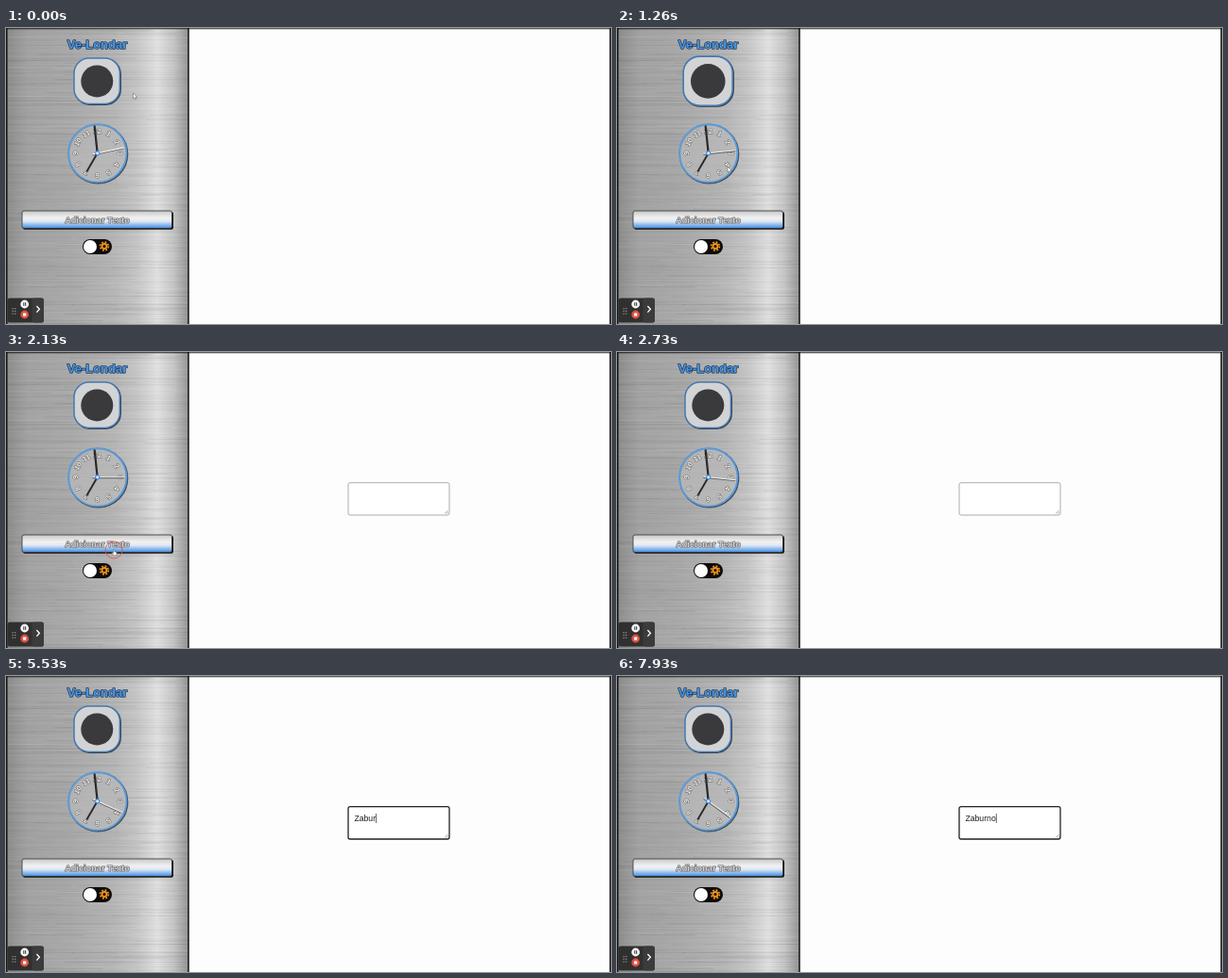
Animation of 640 by 314 pixels, one loop 8000 ms. Source, as an HTML page with a canvas:

```html
<!DOCTYPE html>
<html lang="pt">
<head>
<meta charset="utf-8">
<title>Lembretes</title>
<style>
  html, body { margin: 0; width: 100%; height: 100%; overflow: hidden; background: #fdfdfd; }
  canvas, svg { position: absolute; left: 0; top: 0; display: block; }
  text { font-family: "Liberation Sans", Arial, sans-serif; }
  .outlined { paint-order: stroke; stroke-linejoin: round; text-anchor: middle; font-weight: bold; }
  .numeral { font-size: 7.8px; fill: #f0f0f0; stroke: #666; stroke-width: 1; }
</style>
</head>
<body>
<canvas id="metal" width="193" height="314"></canvas>
<svg width="640" height="314" viewBox="0 0 640 314">
  <defs>
    <linearGradient id="steel" x2="0" y2="1">
      <stop offset="0" stop-color="#c9c9c9"/>
      <stop offset=".4" stop-color="#f1f1f1"/>
      <stop offset=".6" stop-color="#dfe9f5"/>
      <stop offset="1" stop-color="#3f8ae0"/>
    </linearGradient>
    <linearGradient id="topShade" x2="0" y2="1">
      <stop offset="0" stop-color="#000" stop-opacity=".85"/>
      <stop offset="1" stop-color="#000" stop-opacity="0"/>
    </linearGradient>
  </defs>

  <rect width="640" height="2" fill="url(#topShade)"/>
  <path d="M.8 0V314M193 0V314M639.2 0V314" stroke="#111" stroke-width="1.5"/>

  <text class="outlined" x="96.5" y="22.3" font-size="13"
        fill="#4596e8" stroke="#26384c" stroke-width="1.4">Ve-Londar</text>

  <g id="badge">
    <rect x="72.8" y="32.8" width="48.4" height="48.4" rx="16" fill="none" stroke="#2c3540" stroke-width="1.4"/>
    <rect x="72" y="32" width="48.4" height="48.4" rx="16" fill="#d2d3d5" stroke="#4379b0" stroke-width="1.5"/>
    <circle cx="96.3" cy="56.4" r="17" fill="#3a3a3c"/>
  </g>

  <g transform="translate(96.7 132.8)">
    <circle cx=".8" cy=".9" r="31" fill="none" stroke="#46525e" stroke-width="1.7"/>
    <circle r="30.7" fill="#b9b9b9" fill-opacity=".7" stroke="#559ce2" stroke-width="1.7"/>
    <g id="numerals"></g>
    <g stroke-linecap="round">
      <path d="M0 0L-11 19" stroke="#2a2a2a" stroke-width="1.9"/>
      <path d="M0 0L-3 -28.5" stroke="#2a2a2a" stroke-width="2.2"/>
      <g id="second">
        <path d="M.7 5V-28" stroke="#555" stroke-width="1.4"/>
        <path d="M0 5V-28.5" stroke="#f4f4f4" stroke-width="1.1"/>
      </g>
    </g>
    <circle r="2" fill="#fff" stroke="#3b8fe8" stroke-width="1.2"/>
  </g>

  <rect x="18" y="195" width="159" height="18.8" rx="2" fill="#0b0b0b"/>
  <rect x="17" y="194" width="158.5" height="18.5" rx="2" fill="url(#steel)" stroke="#333" stroke-width=".8"/>
  <text class="outlined" x="96.5" y="206.5" font-size="9.2"
        fill="#d2d2d2" stroke="#626262" stroke-width="1.2">Adicionar Texto</text>

  <rect x="81" y="224" width="31" height="16" rx="8" fill="#0c0c0c"/>
  <circle cx="89" cy="232" r="7" fill="#fff"/>
  <g transform="translate(104 231.5)" fill="none" stroke="#f0941c">
    <circle r="2.5" stroke-width="1.9"/>
    <circle r="4.4" stroke-width="1.7" stroke-dasharray="1.9 1.556"/>
  </g>

  <rect x="1.5" y="286.5" width="38.5" height="26" rx="2.5" fill="#303030"/>
  <rect x="27.5" y="286.5" width="12.5" height="26" rx="2.5" fill="#3b3b3b"/>
  <path d="M7.2 297V304M9.7 297V304" stroke="#999" stroke-width="1.2" stroke-dasharray="1.2 1.6"/>
  <circle cx="19.7" cy="293" r="4.4" fill="#f5f5f5"/>
  <path d="M18.8 291.2v3.6M20.7 291.2v3.6" stroke="#333"/>
  <circle cx="19.7" cy="304" r="4.4" fill="#e0503f"/>
  <rect x="18.1" y="302.4" width="3.2" height="3.2" fill="#fff"/>
  <path d="M32.4 295l3 3.3-3 3.3" fill="none" stroke="#fff" stroke-width="1.3"/>

  <g id="note">
    <rect id="field" x="362" y="138.7" width="107" height="34.3" rx="2" fill="#fff"/>
    <path d="M464.3 171.3l3.2-3.2M466.3 171.5l1.4-1.4" stroke="#777" stroke-width=".7"/>
    <text id="typed" x="368.4" y="153.5" font-size="8.7" fill="#1c1c1c"></text>
    <rect id="caret" y="146" width=".8" height="10" fill="#444"/>
  </g>

  <g id="pointer" stroke="#555" stroke-width=".5" stroke-linejoin="round">
    <path id="arrow" d="M.5 0V6L1.9 4.8 2.8 6.8 3.8 6.4 2.9 4.5H4.7Z" fill="#fff"/>
    <path id="hand" d="M0 0q.8-.6 1.2 .2V2.2l2.4 .7V5L2.9 6.4H.4L-1.4 3.6l.6-.5 .8 .7Z" fill="#fff"/>
  </g>
  <circle id="ring" cx="114" cy="210" r="9" fill="none" stroke="#e0524c" stroke-width=".9"/>
</svg>

<script>
const LOOP = 8000;
const WORD = "Zaburno";
const KEY_TIMES = [4530, 4860, 5130, 5330, 5460, 5660, 5860];
const CARET_ON = [[3000, 3530], [4000, 6330], [6860, 7400], [7900, 8000]];
// The pointer is not drawn inside the text field.
const POINTER_ON = [[0, 2600], [6580, 7400]];
// time, x, y of the pointer tip
const POINTER_PATH = [
  [0, 134, 69], [60, 133, 69], [300, 118, 65], [860, 103, 62], [1000, 103, 62],
  [1260, 116.5, 147], [1860, 113.5, 209.5], [2200, 113.5, 209.5], [2600, 360, 160],
  [2930, 410, 155], [6530, 455, 163], [6660, 503, 171.5], [6900, 521, 175],
  [7260, 470.5, 163]
];
const BADGE_SCALE = [[0, 1], [200, 1], [600, 1.09], [1200, 1.09], [1600, 1]];

const el = id => document.getElementById(id);
const show = (id, on) => el(id).setAttribute("display", on ? "inline" : "none");
const within = (t, spans) => spans.some(([from, to]) => t >= from && t < to);

function sample(table, t) {
  const next = table.findIndex(row => row[0] > t);
  if (next < 0) return table[table.length - 1].slice(1);
  const a = table[next - 1], b = table[next];
  const k = (t - a[0]) / (b[0] - a[0]);
  return a.slice(1).map((v, i) => v + (b[i + 1] - v) * k);
}

function paintMetal() {
  const ctx = el("metal").getContext("2d");
  const shade = ctx.createLinearGradient(0, 0, 193, 0);
  [[0, "#8c8c8c"], [.12, "#a2a2a2"], [.35, "#a8a8a8"], [.6, "#b6b6b6"],
   [.72, "#c6c6c6"], [.83, "#e0e0e0"], [.92, "#c4c4c4"], [1, "#949494"]]
    .forEach(stop => shade.addColorStop(...stop));
  ctx.fillStyle = shade;
  ctx.fillRect(0, 0, 193, 314);
  let seed = 17;
  const random = () => (seed = seed * 16807 % 2147483647) / 2147483647;
  for (let i = 0; i < 1100; i++) {
    const tone = random() < .5 ? 0 : 255;
    ctx.fillStyle = `rgba(${tone},${tone},${tone},${random() * .055})`;
    ctx.fillRect(random() * 250 - 80, random() * 314, 50 + random() * 110, .6 + random() * .7);
  }
}

function addNumerals() {
  for (let n = 1; n <= 12; n++) {
    const label = document.createElementNS("http://www.w3.org/2000/svg", "text");
    label.setAttribute("class", "outlined numeral");
    label.setAttribute("transform", `rotate(${n * 30}) translate(0 -21)`);
    label.textContent = n;
    el("numerals").append(label);
  }
}

function draw(t) {
  const seconds = 13 + Math.floor((t + 540) / 1000);
  el("second").setAttribute("transform", `rotate(${seconds * 6})`);

  const [scale] = sample(BADGE_SCALE, t);
  el("badge").setAttribute("transform",
    `translate(96.5 56.5) scale(${scale}) translate(-96.5 -56.5)`);

  const focused = t >= 2930;
  show("note", t >= 2060);
  el("field").setAttribute("stroke", focused ? "#222" : "#999");
  el("field").setAttribute("stroke-width", focused ? 1.3 : .8);
  el("typed").textContent = WORD.slice(0, KEY_TIMES.filter(k => t >= k).length);
  el("caret").setAttribute("x", 368.5 + el("typed").getComputedTextLength());
  show("caret", within(t, CARET_ON));

  const [x, y] = sample(POINTER_PATH, t);
  const onButton = x < 176 && y > 194;
  el("pointer").setAttribute("transform", `translate(${x} ${y})`);
  show("pointer", within(t, POINTER_ON));
  show("arrow", !onButton);
  show("hand", onButton);
  show("ring", t >= 2060 && t < 2330);
}

paintMetal();
addNumerals();
const start = performance.now();
function tick() {
  draw((performance.now() - start) % LOOP);
  requestAnimationFrame(tick);
}
tick();
</script>
</body>
</html>
```
